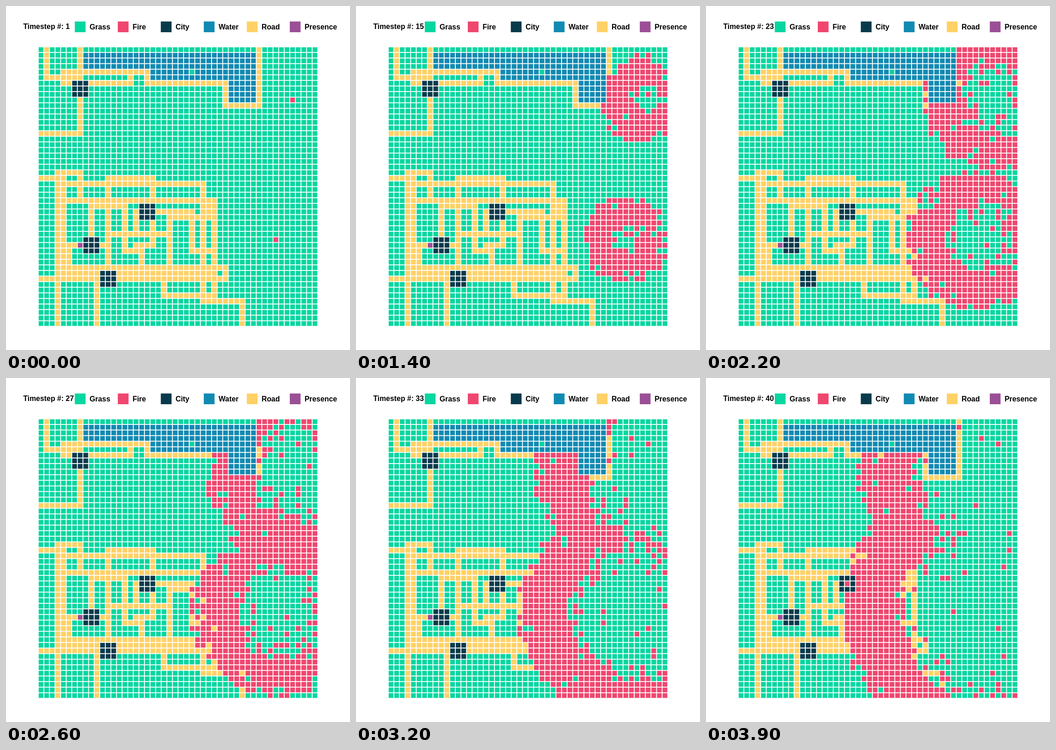
Write an HTML page with a canvas that moves like this. It is 748 by 748 pixels and loops after 4000 ms.

```html
<!DOCTYPE html>
<html lang="en">
<head>
<meta charset="utf-8">
<title>Wildfire grid</title>
<style>
  html, body { margin: 0; width: 100%; height: 100%; overflow: hidden; background: #fff; }
  canvas { display: block; width: 748px; height: 748px; }
</style>
</head>
<body>
<canvas id="stage" width="748" height="748"></canvas>
<script>
const ctx = document.getElementById('stage').getContext('2d');
const SCALE = 0.935, SIZE = 50, STEPS = 40, STEP_MS = 100;
const COLORS = {
  Grass: '#06d6a0', Fire: '#ef476f', City: '#073b4c',
  Water: '#118ab2', Road: '#ffd166', Presence: '#9b4f96'
};

const land = Array.from({ length: SIZE }, () => Array(SIZE).fill('Grass'));

function fillLand(kind, c0, r0, c1, r1) {
  for (let r = Math.min(r0, r1); r <= Math.max(r0, r1); r++) {
    land[r].fill(kind, Math.min(c0, c1), Math.max(c0, c1) + 1);
  }
}

// Follows a path of M, H and V commands in grid units
function pave(path) {
  let c, r;
  for (const [, command, a, b] of path.matchAll(/([MHV])(\d+) ?(\d*)/g)) {
    const fromC = c, fromR = r;
    if (command === 'M') { c = +a; r = +b; continue; }
    if (command === 'H') c = +a; else r = +a;
    fillLand('Road', fromC, fromR, c, r);
  }
}

function buildLand() {
  fillLand('Water', 8, 1, 38, 3);
  fillLand('Water', 20, 4, 38, 5);
  fillLand('Water', 34, 6, 38, 9);
  fillLand('Grass', 27, 4, 27, 4);
  // Lakeside roads
  pave('M1 0V5H7 M7 0V15H0 M4 6V4H19V6H33V10H39V0 M4 6H16V4');
  // Main streets of the town
  pave('M0 23H4 M3 49V22H7V27 M4 22V41 M3 24H29V45H36V49 M4 27H31V45 M30 27V30');
  pave('M3 39H33V41H0 M3 40H31 M10 42V49 M22 42V44H31');
  // Inner blocks
  pave('M12 27V23H20V27 M9 33V28H15V36H18V38 M12 28V38 M17 29V33 M12 33H23');
  pave('M17 35H20V31 M21 29H27V36H31 M31 30H23V38 M3 35H6 M5 35V41 M11 35H12');
  for (const [c, r] of [[6, 6], [18, 28], [8, 34], [11, 40]]) {
    fillLand('City', c, r, c + 2, r + 2);
  }
  fillLand('Presence', 7, 35, 7, 35);
}

// Seeded noise in 0..1 for a cell
function noise(c, r, seed) {
  let h = Math.imul(c + 11, 374761393) ^ Math.imul(r + 7, 668265263) ^ Math.imul(seed, 1274126177);
  h = Math.imul(h ^ (h >>> 13), 1103515245);
  h = Math.imul(h ^ (h >>> 16), 2246822519);
  return ((h ^ (h >>> 15)) >>> 0) / 4294967296;
}

// Fire spreads in rings from two ignition points, slowly gaining speed
const ignitions = [[45, 9], [42, 34]];
const SPEED = 0.5, GAIN = 0.003;

function ignitionTime(c, r) {
  const distance = Math.min(...ignitions.map(([x, y]) => Math.hypot(c - x, r - y)));
  const n = noise(c, r, 1);
  const rough = 1.6 * (n - 0.4) + 4 * n ** 14;
  const reach = distance + rough * Math.min(1, distance);
  return (Math.sqrt(SPEED ** 2 + 4 * GAIN * reach) - SPEED) / (2 * GAIN);
}

// Cells in the west burn longer; a few embers outlast the rest
function burnTime(c, r) {
  const n = noise(c, r, 2);
  return 8.5 + 6 * n + 20 * n ** 25 + 0.3 * (42 - c);
}

function canBurn(c, r) {
  const kind = land[r][c];
  const behindLake = r < 6 && c < 39;
  if (kind === 'Water' || kind === 'Presence' || behindLake) return false;
  return kind !== 'City' || noise(c, r, 3) < 0.2;
}

buildLand();
const cells = [];
for (let r = 0; r < SIZE; r++) {
  for (let c = 0; c < SIZE; c++) {
    const lit = canBurn(c, r) ? ignitionTime(c, r) : Infinity;
    cells.push({ c, r, kind: land[r][c], lit, out: lit + burnTime(c, r) });
  }
}

function drawLegend(step) {
  ctx.font = 'bold 17px "Liberation Sans", Arial, sans-serif';
  ctx.fillStyle = '#000';
  ctx.fillText('Timestep #: ' + step, 40, 54);
  Object.keys(COLORS).forEach((name, i) => {
    ctx.fillStyle = COLORS[name];
    ctx.fillRect(160 + 100 * i, 36, 25, 25);
    ctx.fillStyle = '#000';
    ctx.fillText(name, 194.3 + 100 * i, 55);
  });
}

function draw(step) {
  ctx.setTransform(1, 0, 0, 1, 0, 0);
  ctx.fillStyle = '#fff';
  ctx.fillRect(0, 0, 748, 748);
  ctx.scale(SCALE, SCALE);
  drawLegend(step);
  const time = step - 1;
  for (const { c, r, kind, lit, out } of cells) {
    ctx.fillStyle = COLORS[lit <= time && time < out ? 'Fire' : kind];
    ctx.fillRect(76 + 13 * c, 96 + 13 * r, 11, 11);
  }
}

let start = null, shown = 1;
function tick(now) {
  if (start === null) start = now;
  const step = Math.floor((now - start) / STEP_MS) % STEPS + 1;
  if (step !== shown) draw(shown = step);
  requestAnimationFrame(tick);
}
draw(shown);
requestAnimationFrame(tick);
</script>
</body>
</html>
```
